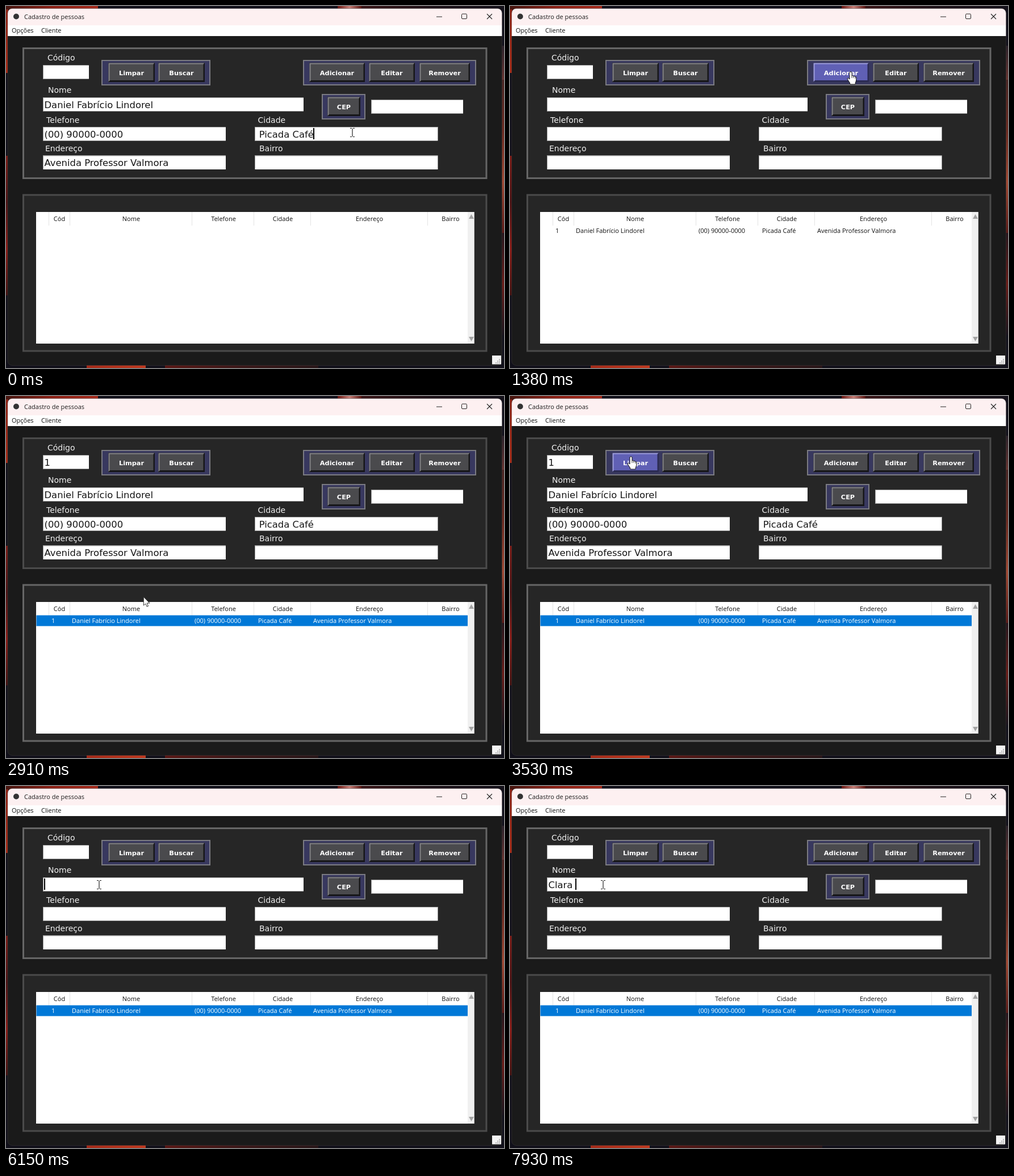
Write an HTML page with a canvas that moves like this. It is 877 px wide and 638 px high and loops after 7990 ms.

```html
<!DOCTYPE html>
<html lang="pt-BR">
<head>
<meta charset="utf-8">
<title>Cadastro de pessoas</title>
<style>
html, body { margin: 0; width: 100%; height: 100%; overflow: hidden; background: #0e0d14; }
canvas { display: block; }
</style>
</head>
<body>
<canvas id="stage" width="877" height="638"></canvas>
<script>
const W = 877, H = 638, LOOP = 7990;
const ctx = document.getElementById('stage').getContext('2d', { alpha: false });
const SANS = '"DejaVu Sans", Verdana, sans-serif';
const UI = '11px "Open Sans", "Noto Sans", sans-serif';
const ENTRY = '16.4px ' + SANS, LABEL = '14px ' + SANS, BOLD = 'bold 11.3px ' + SANS;

const person = ['Daniel Fabrício Lindorel', '(00) 90000-0000', ' Picada Café', 'Avenida Professor Valmora'];
const typed = 'Clara ', keyTimes = [6900, 7050, 7200, 7360, 7520, 7800];

// Moments when something is clicked
const ADD = 1150, SELECT = 2130, LOAD = 2620, CLEAR = 4110, FOCUS = 5600;

// Pointer keys: time, x, y
const path = [[0, 610, 223], [180, 610, 223], [880, 600, 116], [1420, 600, 116], [2080, 248, 402],
  [2750, 248, 402], [3380, 213, 107], [4230, 213, 107], [4960, 368, 213], [5030, 368, 213],
  [5550, 164, 174], [LOOP, 164, 174]];

const buttons = [['Limpar', 180, 100, 82], ['Buscar', 268, 100, 82], ['Adicionar', 534, 100, 98],
  ['Editar', 639, 100, 81], ['Remover', 728, 100, 89], ['CEP', 566, 160, 58]];
const groups = [[168, 95, 192], [523, 95, 305], [556, 155, 77]];
const entries = { code: [65, 104, 81], name: [65, 161, 459], cep: [643, 165, 162], phone: [65, 213, 322],
  city: [438, 213, 322.5], street: [65, 263.5, 322], area: [438, 263.5, 322.5] };
const labels = [['Código', 73, 96], ['Nome', 74, 153], ['Telefone', 71, 205.5], ['Cidade', 443.5, 205.5],
  ['Endereço', 69, 256], ['Bairro', 446, 256]];
const heads = [['Cód', 94], ['Nome', 220.5], ['Telefone', 383], ['Cidade', 487.5], ['Endereço', 640], ['Bairro', 783]];

function rect(x, y, w, h, color) {
  ctx.fillStyle = color;
  ctx.fillRect(x, y, w, h);
}

function text(s, x, y, font, color, align = 'left') {
  ctx.font = font;
  ctx.fillStyle = color;
  ctx.textAlign = align;
  ctx.fillText(s, x, y);
}

function frame(x, y, w, h, b, edge, fill) {
  rect(x, y, w, h, edge);
  rect(x + b, y + b, w - 2 * b, h - 2 * b, fill);
}

function poly(points, fill, stroke) {
  ctx.beginPath();
  points.forEach(([x, y]) => ctx.lineTo(x, y));
  ctx.closePath();
  ctx.fillStyle = fill;
  ctx.fill();
  if (stroke) {
    ctx.strokeStyle = stroke;
    ctx.lineWidth = 1;
    ctx.stroke();
  }
}

function line(color, width, ...points) {
  ctx.beginPath();
  points.forEach(([x, y], i) => i % 2 ? ctx.lineTo(x, y) : ctx.moveTo(x, y));
  ctx.strokeStyle = color;
  ctx.lineWidth = width;
  ctx.stroke();
}

const inside = (p, x, y, w, h) => p.x > x && p.x < x + w && p.y > y && p.y < y + h;

function pointer(t) {
  const i = path.findIndex((k, n) => n && t <= k[0]);
  const [t0, x0, y0] = path[i - 1], [t1, x1, y1] = path[i];
  const u = (t - t0) / (t1 - t0), e = u * u * (3 - 2 * u);
  return { x: x0 + (x1 - x0) * e, y: y0 + (y1 - y0) * e };
}

function wallpaper() {
  rect(0, 0, W, H, '#11101a');
  const strip = (x, y, w, h, ...colors) => {
    const g = ctx.createLinearGradient(x, y, w > h ? x + w : x, w > h ? y : y + h);
    colors.forEach((c, i) => g.addColorStop(i / (colors.length - 1), c));
    rect(x, y, w, h, g);
  };
  strip(0, 0, 162, 6, '#46150f', '#8c2015', '#a62a1b');
  strip(584, 0, 42, 6, '#6b1712', '#c88078', '#5a1512');
  strip(626, 0, 251, 6, '#3a1517', '#1d1219', '#14111a');
  strip(0, 6, 4, 112, '#8e2416', '#a82a16');
  strip(0, 264, 4, 246, '#7c1a15', '#4a1113', '#8c1c17', '#41100f');
  strip(873, 70, 4, 60, '#2a2029', '#6a3430');
  strip(873, 130, 4, 270, '#4a2523', '#6d2a20', '#a34a34', '#5b1815');
  strip(873, 400, 4, 180, '#25131a', '#6b1b17', '#16111a');
  strip(142, 633, 104, 5, '#a52a18', '#c03a20');
  strip(280, 633, 270, 5, '#5a1714', '#3a1718', '#281518');
}

function chrome() {
  ctx.save();
  ctx.beginPath();
  ctx.roundRect(3, 4.5, 870.5, 629, 8);
  ctx.clip();
  rect(3, 4, 871, 630, '#1a1a1a');
  rect(3, 4, 871, 30, '#fdf0f1');
  rect(3, 34, 871, 19, '#fefefe');
  ctx.restore();
  ctx.beginPath();
  ctx.roundRect(3, 4.5, 870.5, 629, 8);
  ctx.strokeStyle = '#55505055';
  ctx.lineWidth = 1;
  ctx.stroke();
  ctx.beginPath();
  ctx.arc(18, 18.5, 5, 0, 7);
  ctx.fillStyle = '#333';
  ctx.fill();
  text('Cadastro de pessoas', 32, 23, UI, '#1c1c1c');
  text('Opções', 10, 47, UI, '#111');
  text('Cliente', 62, 47, UI, '#111');
  line('#222', 1, [758, 19], [768, 19]);
  ctx.beginPath();
  ctx.roundRect(802.5, 14, 9, 8.5, 1.5);
  ctx.stroke();
  line('#222', 1.1, [847, 14], [856, 23], [856, 14], [847, 23]);
  rect(856, 616, 16, 15.5, '#f3f3f3');
  for (let i = 0; i < 3; i++)
    for (let j = 0; j <= i; j++) rect(868 - 3 * j, 622 + 3 * i, 2, 2, '#b4b4b4');
}

function button([name, x, y, w], p) {
  const hot = inside(p, x, y, w, 34);
  rect(x, y, w, 34, hot ? '#2b2b52' : '#161618');
  poly([[x + 0.5, y + 0.5], [x + w - 0.5, y + 0.5], [x + w - 3, y + 3], [x + 3, y + 31], [x + 0.5, y + 33.5]],
    hot ? '#a0a0dc' : '#86868b');
  rect(x + 2.5, y + 2.5, w - 5, 28.5, hot ? '#6060b5' : '#4a4a4d');
  text(name, x + w / 2, y + 22, BOLD, '#fff', 'center');
}

function entry(key, value, caret) {
  const [x, y, w] = entries[key];
  rect(x, y, w, 24.5, '#fff');
  rect(x, y, w, 1, '#a0a0a0');
  rect(x, y, 1, 24.5, '#a0a0a0');
  text(value, x + 2.5, y + 18.5, ENTRY, '#161616');
  if (caret) rect(Math.round(x + 1.5 + ctx.measureText(value).width), y + 2, 2, 20, '#000');
}

function table(t) {
  rect(53, 363, 771.5, 232, '#fff');
  rect(813, 363, 11.5, 232, '#f0f0f0');
  poly([[815, 375], [819.5, 367], [824, 375]], '#a3a3a3');
  poly([[815, 583], [819.5, 591], [824, 583]], '#a3a3a3');
  for (const x of [75, 112, 327, 436, 536, 742]) rect(x, 363, 1, 24, '#e4e4e4');
  for (const [s, x] of heads) text(s, x, 379, UI, '#111', 'center');
  if (t < ADD) return;
  const chosen = t >= SELECT;
  if (chosen) rect(53.5, 386.5, 759.5, 19, '#0078d7');
  const [name, phone, city, street] = person;
  [['1', 80], [name, 116], [phone, 332], [city.trim(), 444], [street, 541]]
    .forEach(([s, x]) => text(s, x, 400, UI, chosen ? '#fff' : '#111'));
}

function cursor(p, kind) {
  ctx.save();
  ctx.translate(p.x, p.y);
  ctx.lineJoin = 'round';
  if (kind === 'text') {
    line('#222', 1.2, [0, -7], [0, 7], [-4, -7.5], [-1, -7.5], [1, -7.5], [4, -7.5],
      [-4, 7.5], [-1, 7.5], [1, 7.5], [4, 7.5]);
  } else if (kind === 'hand') {
    ctx.beginPath();
    ctx.moveTo(-2, 1);
    ctx.quadraticCurveTo(0, -2, 2, 1);
    ctx.lineTo(2, 7);
    ctx.quadraticCurveTo(4, 5.5, 5, 8);
    ctx.quadraticCurveTo(7, 6.5, 8, 9);
    ctx.quadraticCurveTo(10, 8, 10, 11);
    ctx.lineTo(9.5, 16);
    ctx.quadraticCurveTo(8, 19, 8, 22);
    ctx.lineTo(-1, 22);
    ctx.quadraticCurveTo(-1, 19, -4, 16);
    ctx.lineTo(-6, 12);
    ctx.quadraticCurveTo(-5, 9.5, -2, 13);
    ctx.closePath();
    ctx.fillStyle = '#fff';
    ctx.fill();
    ctx.strokeStyle = '#111';
    ctx.lineWidth = 1;
    ctx.stroke();
    line('#111', 0.8, [2, 7], [2, 11], [5, 8], [5, 11], [8, 9.5], [8, 12]);
  } else {
    poly([[0, 0], [0, 15], [3.5, 12], [5.8, 17.2], [8.2, 16.2], [6, 11], [10.7, 11]], '#fff', '#333');
  }
  ctx.restore();
}

function caretAt(t) {
  if (t < SELECT) return (t + 300) % 900 < 600 ? 'city' : '';
  if (t < FOCUS) return '';
  return t >= keyTimes[0] || (t - FOCUS) % 900 < 600 ? 'name' : '';
}

function draw(t) {
  const p = pointer(t);
  const tableFocus = t >= SELECT && t < FOCUS;
  const loaded = t >= LOAD && t < CLEAR;
  const filled = t < ADD || loaded;
  const caret = caretAt(t);
  const edge = on => on ? '#666666' : '#4b4b4b';

  wallpaper();
  chrome();
  frame(29, 73, 818.5, 232, 3, edge(!tableFocus), '#262626');
  frame(29, 331.5, 818.5, 278, 3, edge(tableFocus), '#262626');
  for (const [x, y, w] of groups) frame(x, y, w, 45, 2, '#7b7b82', '#38385f');
  for (const b of buttons) button(b, p);
  for (const [s, x, y] of labels) text(s, x, y, LABEL, '#f0f0f0');

  const [name, phone, city, street] = filled ? person : ['', '', '', ''];
  const count = keyTimes.filter(k => t >= k).length;
  const values = { code: loaded ? '1' : '', name: name || typed.slice(0, count), cep: '', phone, city, street, area: '' };
  for (const key in entries) entry(key, values[key], caret === key);
  table(t);

  const kind = buttons.some(([, x, y, w]) => inside(p, x, y, w, 34)) ? 'hand'
    : Object.values(entries).some(([x, y, w]) => inside(p, x, y + 1, w, 24)) ? 'text' : 'arrow';
  cursor(p, kind);
}

const start = performance.now();
function tick() {
  draw((performance.now() - start) % LOOP);
  requestAnimationFrame(tick);
}
tick();
</script>
</body>
</html>
```
